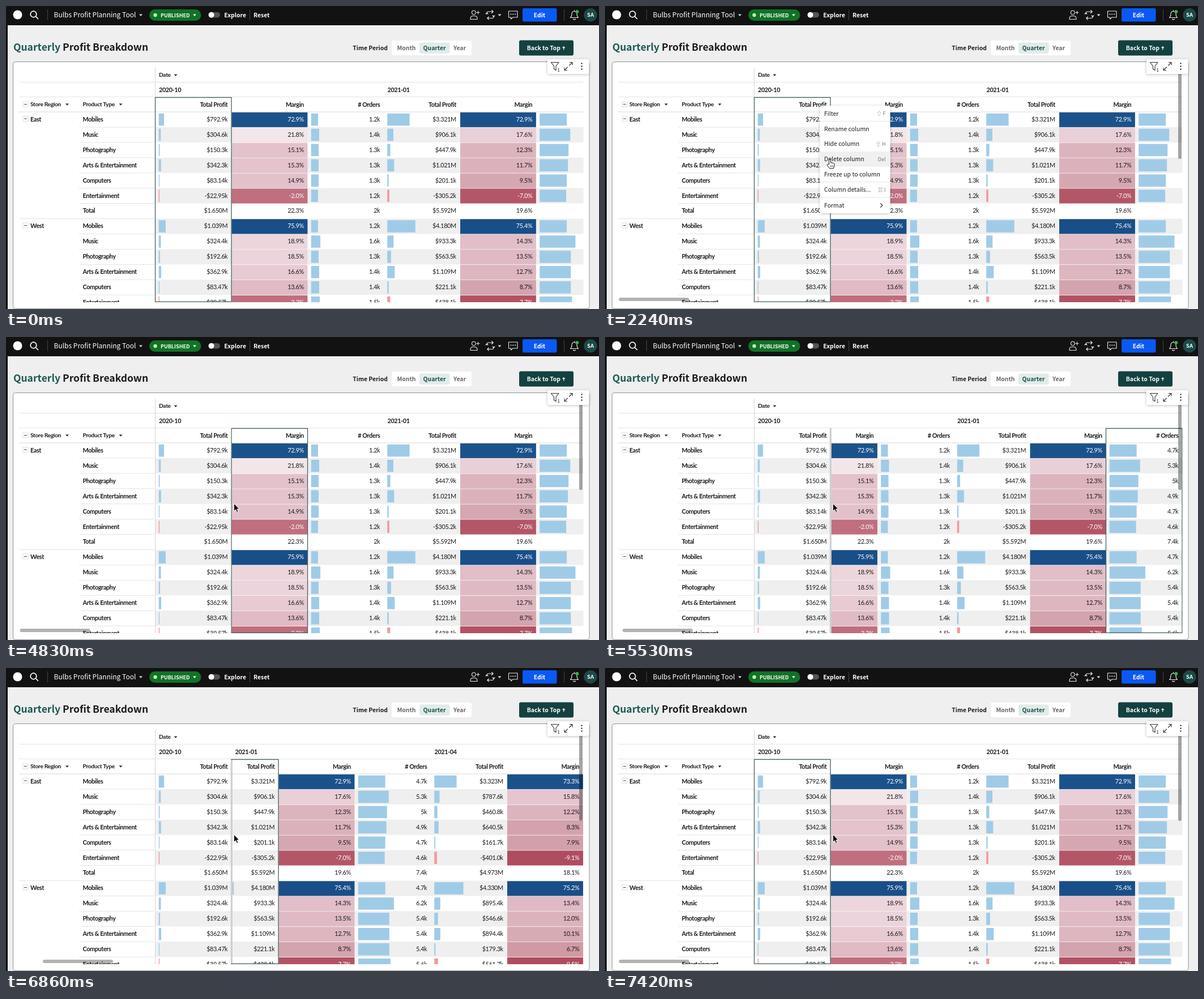
These frames come from a looping animation (1047 by 535 pixels, 8 s). An HTML page:

```html
<!DOCTYPE html>
<html lang="en">
<head>
<meta charset="utf-8">
<title>Profit breakdown</title>
<style>
  html, body { margin: 0; width: 100%; height: 100%; overflow: hidden; background: #efefef; }
  svg { display: block; width: 1047px; height: 535px; }
  text { font: 400 10.5px "Noto Sans CJK JP", "Noto Sans CJK SC", "Open Sans", sans-serif; fill: #1c1c1c; }
  text.cell { font: 400 10.9px Lato, sans-serif; letter-spacing: -.36px; }
  text.label { font: 700 10.9px Lato, sans-serif; letter-spacing: -.4px; }
  text.head { font: 700 10.8px Lato, sans-serif; letter-spacing: -.36px; }
  text.small { font-size: 10.3px; }
  text.bold { font-weight: 600; font-size: 10.4px; }
  text.key { font-size: 9px; fill: #777; }
  .icon { fill: none; stroke: #e8e8e8; stroke-width: 1.1; stroke-linecap: round; stroke-linejoin: round; }
  .dark { stroke: #333; }
</style>
</head>
<body>
<svg id="stage" viewBox="0 0 1047 535"></svg>
<script>
const LOOP = 8000, TICK = 70;
const LEFT = 263.5, COL = 134.5, FROZEN = LEFT + COL, RIGHT = 1019;
const TOP = 187, ROW = 26.93, BOTTOM = 523;
const OUTLINE = '#466360';

const products = ['Mobiles', 'Music', 'Photography', 'Arts & Entertainment', 'Computers', 'Entertainment', 'Total'];
const columns = [
  ['Total Profit', '$792.9k $304.6k $150.3k $342.3k $83.14k -$22.95k $1.650M $1.039M $324.4k $192.6k $362.9k $83.47k -$39.57k'],
  ['Margin', '72.9% 21.8% 15.1% 15.3% 14.9% -2.0% 22.3% 75.9% 18.9% 18.5% 16.6% 13.6% -2.2%'],
  ['# Orders', '1.2k 1.4k 1.3k 1.3k 1.3k 1.2k 2k 1.2k 1.6k 1.3k 1.4k 1.4k 1.5k'],
  ['Total Profit', '$3.321M $906.1k $447.9k $1.021M $201.1k -$305.2k $5.592M $4.180M $933.3k $563.5k $1.109M $221.1k -$438.1k'],
  ['Margin', '72.9% 17.6% 12.3% 11.7% 9.5% -7.0% 19.6% 75.4% 14.3% 13.5% 12.7% 8.7% -7.7%'],
  ['# Orders', '4.7k 5.3k 5k 4.9k 4.7k 4.6k 7.4k 4.7k 6.2k 5.4k 5.4k 5.4k 5.6k'],
  ['Total Profit', '$3.323M $787.6k $460.8k $640.5k $161.7k -$401.0k $4.973M $4.330M $895.4k $546.6k $894.4k $179.3k -$561.7k'],
  ['Margin', '73.3% 15.8% 12.2% 8.3% 7.9% -9.1% 18.1% 75.2% 13.4% 12.0% 10.1% 6.7% -9.5%']
];

// time, selected column, horizontal scroll
const selections = [
  [0, 1, 0], [4830, 2, 0], [5040, 3, 0], [5180, 4, 0], [5390, 5, 0],
  [5530, 6, 51.5], [5740, 7, 186], [5950, 8, 320.5],
  [6300, 7, 320.5], [6510, 6, 320.5], [6650, 5, 320.5], [6790, 4, 320.5],
  [7000, 3, 269], [7140, 2, 134.5], [7280, 1, 0]
];
// time, x, y of the pointer tip
const pointerPath = [[280, 484, 474], [840, 380.5, 175], [1680, 380.5, 175], [2380, 399, 282], [2870, 402.5, 294]];
const scrollbarFade = [[1049, 0], [1050, .7], [1120, 1], [2450, 1], [2870, 0], [3990, 0], [4130, 1]];
const menuFade = [[1049, 0], [1050, .8], [1120, 1], [4059, 1], [4060, .4], [4130, 0]];

const esc = s => s.replace(/&/g, '&amp;');
const rect = (x, y, w, h, fill, extra = '') => `<rect x="${x}" y="${y}" width="${w}" height="${h}" fill="${fill}" ${extra}/>`;
const text = (x, y, s, cls = '', extra = '') => `<text x="${x}" y="${y}" class="${cls}" ${extra}>${esc(s)}</text>`;
const line = (x1, y1, x2, y2, color = '#e4e4e4', w = 1) =>
  `<line x1="${x1}" y1="${y1}" x2="${x2}" y2="${y2}" stroke="${color}" stroke-width="${w}"/>`;
const icon = (d, cls = '') => `<path class="icon ${cls}" d="${d}"/>`;
const caret = (x, y, fill) => `<path d="M${x - 3} ${y - 1.5}h6l-3 3.4z" fill="${fill}"/>`;
const white = 'style="fill:#fff"', end = 'text-anchor="end"', middle = 'text-anchor="middle"';
const colX = n => LEFT + (n - 1) * COL;
const rowY = i => TOP + i * ROW;

function ramp(keys, t, ease = k => k) {
  if (t <= keys[0][0]) return keys[0].slice(1);
  for (let i = 1; i < keys.length; i++) {
    const [a, b] = [keys[i - 1], keys[i]];
    if (t <= b[0]) {
      const k = ease((t - a[0]) / (b[0] - a[0]));
      return a.slice(1).map((v, j) => v + (b[j + 1] - v) * k);
    }
  }
  return keys[keys.length - 1].slice(1);
}

function marginColor(v) {
  if (v > 50) return v > 74.5 ? '#194e88' : '#1c528b';
  const rgb = ramp([[-9, 174, 77, 95], [-2, 191, 111, 127], [9, 212, 165, 175], [15, 227, 193, 203], [22, 243, 231, 234]], v);
  return `rgb(${rgb.map(Math.round)})`;
}

function cell(kind, value, x, i) {
  const v = parseFloat(value.replace('$', '')), y = rowY(i);
  const total = i % 7 === 6;
  let shape = '', style = end;
  if (kind === 'Margin') {
    if (!total) shape = rect(x + .5, y + .8, COL - .6, ROW - .8, marginColor(v));
    if (!total && (v > 50 || v < 0)) style += ' ' + white;
  } else if (!total) {
    const scale = kind === '# Orders' ? 10.2 : value.endsWith('M') ? 11.85 : .01185;
    shape = rect(x + 6.2, y + 2.7, Math.max(1.4, Math.abs(v) * scale), 21.6, v < 0 ? '#f19a9d' : '#a0cbe7');
  }
  return shape + text(x + COL - 6.7, y + 16.9, value, 'cell', style);
}

function column(n) {
  const [title, values] = columns[n - 1], x = colX(n);
  return text(x + COL - 6.7, 177.5, title, 'head', end) +
    values.split(' ').map((v, i) => cell(title, v, x, i)).join('');
}

function collapse(x, y) {
  return rect(x - 4.5, y - 4.5, 9, 9, '#fff', 'stroke="#d6d6d6" stroke-width=".8"') + line(x - 2.5, y, x + 2.5, y, '#444');
}

function topBar() {
  return rect(0, 0, 1047, 34, '#121212') + rect(0, 0, 3, 535, '#121212') +
    '<circle cx="20.5" cy="15.5" r="8" fill="#fff"/>' +
    '<g stroke-width="1.7"><circle cx="48.5" cy="14.5" r="5.3" fill="none" stroke="#fff"/>' +
    '<path d="M52.5 18.5l4.5 4.5" stroke="#fff"/></g>' +
    line(73.5, 6, 73.5, 25, '#444') +
    text(84.5, 20.2, 'Bulbs Profit Planning Tool', '', 'style="font-size:12px;fill:#fff"') + caret(238, 16, '#ddd') +
    rect(253, 6, 91.5, 20, '#107326', 'rx="10"') + '<circle cx="263.5" cy="16" r="3.2" fill="#b9f3b4"/>' +
    text(273, 19.6, 'PUBLISHED', 'bold', 'style="font-size:9px;fill:#fff"') + caret(333, 16, '#fff') +
    rect(358, 11, 20, 9.5, '#555', 'rx="4.7"') + '<circle cx="362.5" cy="15.7" r="5" fill="#fff"/>' +
    text(385.3, 20, 'Explore', 'bold', white) + line(430.5, 7, 430.5, 25, '#444') + text(437, 20, 'Reset', 'bold', white) +
    icon('M820 23.5v-1.5q0-4.5 5-4.5h2q5 0 5 4.5v1.5zM829.5 11.5a3.5 3.5 0 1 1-7 0a3.5 3.5 0 1 1 7 0M833.5 9v5M831 11.5h5') +
    icon('M849 14v-1.5q0-2.5 2.5-2.5h8.5M857.5 7.5l2.8 2.5-2.8 2.5M861 17v2q0 2.5-2.5 2.5h-8M852.5 19l-2.8 2.5 2.8 2.5M847 14l2-2 2 2M859 17l2 2 2-2') +
    caret(871.5, 16, '#ddd') +
    icon('M887.5 9h15.5v11h-8l-3.5 3v-3h-4z') +
    '<g fill="#eee"><circle cx="891.5" cy="14.5" r="1"/><circle cx="895.2" cy="14.5" r="1"/><circle cx="899" cy="14.5" r="1"/></g>' +
    rect(912, 4, 60.5, 23.6, '#0b58f5', 'rx="2.5"') + text(942, 19.8, 'Edit', 'bold', middle + ' ' + white) +
    line(985.5, 6, 985.5, 26, '#444') +
    icon('M996.5 20.5q2.5-2 2.5-6.5q0-4.5 4.5-4.5t4.5 4.5q0 4.5 2.5 6.5zM1001.5 23q2 2 4 0M1003.5 9.5v-2') +
    '<circle cx="1008.3" cy="10" r="3" fill="#35b34a"/>' +
    '<circle cx="1032" cy="15.7" r="11.7" fill="#1c4a48"/>' + text(1032, 19.4, 'SA', 'bold', middle + ' style="fill:#fff;font-size:9.4px"');
}

function pageHeader() {
  return `<text x="13" y="78.5" style="font-size:17.5px;font-weight:600"><tspan fill="#1d5953">Quarterly</tspan> Profit Breakdown</text>` +
    text(612.3, 78.2, 'Time Period', 'bold') +
    rect(681, 61, 141, 26, '#fff', 'rx="3"') + rect(730, 64.5, 53.5, 19.5, '#e1ecea', 'rx="3"') +
    text(707, 78.2, 'Month', 'bold', middle + ' style="fill:#666"') +
    text(756.6, 78.2, 'Quarter', 'bold', middle + ' style="fill:#1d4f4a"') +
    text(801, 78.2, 'Year', 'bold', middle + ' style="fill:#666"') +
    rect(906, 60.5, 96, 27, '#144140', 'rx="3"') + text(919.8, 78.2, 'Back to Top', 'bold', white) +
    `<path d="M984.7 77.5v-5.5M982.5 74.2l2.2-2.4 2.2 2.4" fill="none" stroke="#fff" stroke-width="1.2"/>`;
}

function tableFrame() {
  let out = rect(12.5, 98.5, 1017.5, 436, '#fff', 'rx="4" stroke="#8b9795"') +
    text(270, 125.4, 'Date', 'head small') + caret(299.5, 122, '#333') +
    line(23, 134.5, RIGHT, 134.5) + line(23, 160.5, RIGHT, 160.5) + line(23, 187, RIGHT, 187, '#d9d9d9') +
    collapse(34.5, 173.5) + text(43, 177.2, 'Store Region', 'head small') + caret(108, 173.8, '#333') +
    text(135.5, 177.2, 'Product Type', 'head small') + caret(202.5, 173.8, '#333');
  let rows = '';
  for (let i = 0; i < 13; i++) {
    const y = rowY(i);
    if (i % 2) rows += rect(LEFT, y, RIGHT - LEFT + .5, ROW, '#efefef');
    rows += text(135.5, y + 16.9, products[i % 7], 'label') + line(i === 6 ? 23 : 129, y + ROW, 262, y + ROW);
  }
  rows += ['East', 'West'].map((name, k) => collapse(34.5, rowY(k * 7) + 12) + text(43, rowY(k * 7) + 16.9, name, 'label')).join('');
  out += `<g clip-path="url(#body)">${rows}</g>` + line(LEFT, 109, LEFT, BOTTOM, '#d4d4d4');
  return out;
}

function tableTools() {
  return rect(956, 94, 73.5, 26, '#fff', 'rx="3" filter="url(#shadow)"') +
    icon('M962.5 99.5h13.5l-5 6.5v7.5l-3.5-2v-5.5z', 'dark') + text(973.5, 115.5, '1', '', 'style="font-size:8px"') +
    icon('M986 113.5l5.5-5.5M986 109v4.5h4.5M1000 99.5l-5.5 5.5M995.5 99.5h4.5v4.5', 'dark') +
    [101.5, 106.5, 111.5].map(y => `<circle cx="1016.5" cy="${y}" r="1.2" fill="#333"/>`).join('');
}

const menuItems = [['Filter', '⇧ F', 176.5], ['Rename column', '', 203.7], ['Hide column', '⇧ H', 230.3], ['Delete column', 'Del', 257],
  ['Freeze up to column', '', 283.5], ['Column details...', '⌘ I', 311], ['Format', '', 338.5]];

function menu() {
  return rect(379.5, 176, 124, 190, '#fff', 'rx="3" filter="url(#shadow)"') +
    rect(379.5, 0, 124, 26.7, '#f0f0f0', 'id="hover"') +
    [203.5, 310.7, 338].map(y => line(380, y, 503, y, '#e6e6e6')).join('') +
    menuItems.map(([name, key, y]) => text(387, y + 17, name) + text(495.5, y + 16.5, key, 'key', end)).join('') +
    icon('M486.5 348.5l3.5 3.5-3.5 3.5', 'dark');
}

const stage = document.getElementById('stage');
const numbers = n => Array.from({ length: n }, (_, i) => i + 1);
const clip = (id, x, y, w, h) => `<clipPath id="${id}"><rect x="${x}" y="${y}" width="${w}" height="${h}"/></clipPath>`;

stage.innerHTML = `<defs>
  ${clip('body', 0, 100, 1047, BOTTOM - 100)}
  ${clip('pane', FROZEN - .8, 100, RIGHT - FROZEN + 1.5, BOTTOM - 100)}
  <filter id="shadow" x="-20%" y="-20%" width="140%" height="150%"><feDropShadow dx="0" dy="1" stdDeviation="2.5" flood-opacity=".25"/></filter>
  </defs>` + rect(0, 0, 1047, 535, '#efefef') + topBar() + pageHeader() + tableFrame() +
  `<g clip-path="url(#body)">${column(1)}</g>` + text(270, 151.6, '2020-10', 'head') +
  `<g clip-path="url(#pane)"><g id="scroller">${numbers(8).slice(1).map(column).join('')}${text(colX(7) + 6.5, 151.6, '2021-04', 'head')}</g>
    ${text(0, 151.6, '2021-01', 'head', 'id="group"')}</g>` +
  rect(396.7, 161, 3.2, BOTTOM - 161, '#cfcfcf', 'id="divider"') +
  `<g id="selectionPane"><rect id="selection" y="161.5" width="${COL}" height="360.7" fill="none" stroke="${OUTLINE}" stroke-width="1.3"/></g>` +
  `<g id="bars">${rect(1012, 110, 6, 160, '#000', 'rx="3" fill-opacity=".36"')}
    ${rect(24.5, 515, 124, 6, '#000', 'rx="3" fill-opacity=".3" id="thumb"')}</g>` +
  tableTools() + `<g id="menu">${menu()}</g>` +
  `<g id="pointer"><path id="arrow" d="M0 0V13.5L3.1 10.6 5.2 15.4 7.4 14.4 5.3 9.8H9.4Z" fill="#000" stroke="#fff" stroke-width=".9"/>
    <g id="hand"><path d="M-1.5 8.5V1.2a1.4 1.4 0 0 1 2.8 0V5.6l5 1q2 .5 1.8 2.4l-.7 4-1 3H-.5L-4.6 10.6q-.8-1.8.8-2.2z" fill="#fff" stroke="#111"/>
    <path d="M1.2 10.5v3M3.2 10.5v3M5.2 10.5v3" stroke="#111" stroke-width=".7"/></g></g>`;

const $ = id => document.getElementById(id);
const set = (id, attrs) => { for (const k in attrs) $(id).setAttribute(k, attrs[k]); };
const show = (id, on) => set(id, { visibility: on ? 'visible' : 'hidden' });
const smooth = k => k * k * (3 - 2 * k);

function draw(now) {
  const t = Math.floor((now % LOOP) / TICK + 1e-6) * TICK;
  const [, col, scroll] = selections.filter(s => s[0] <= t).pop();
  set('scroller', { transform: `translate(${-scroll})` });
  set('group', { x: Math.max(colX(4) - scroll, FROZEN) + 6.5 });
  set('selection', { x: colX(col) - (col > 1 ? scroll : 0) });
  set('selectionPane', { 'clip-path': col > 1 ? 'url(#pane)' : 'url(#body)' });
  show('divider', scroll > 0);
  set('thumb', { x: 24.5 + scroll * .126 });
  set('bars', { opacity: ramp(scrollbarFade, t)[0] });

  const [x, y] = ramp(pointerPath, t, smooth);
  const inMenu = t > 1750 && t < 4060;
  set('pointer', { transform: `translate(${x} ${y})` });
  show('arrow', t >= 280 && !inMenu);
  show('hand', inMenu);

  set('menu', { opacity: ramp(menuFade, t)[0] });
  const item = menuItems.filter(m => m[2] <= y).pop();
  show('hover', inMenu && item);
  if (item) set('hover', { y: item[2], fill: t >= 3850 ? '#e8e8e8' : '#f0f0f0' });
}

const start = performance.now();
function frame() {
  draw(performance.now() - start);
  requestAnimationFrame(frame);
}
frame();
</script>
</body>
</html>
```
